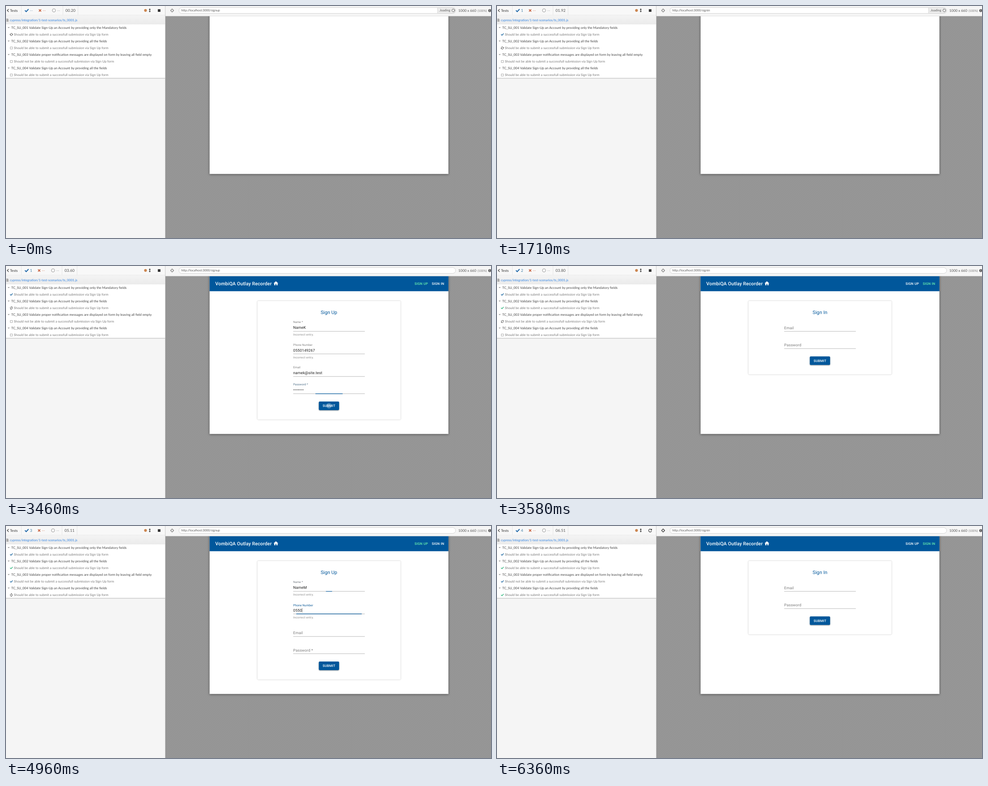
An HTML page that plays this animation: 1083 by 517 pixels, repeating every 6430 ms.

```html
<!DOCTYPE html>
<html lang="en">
<head>
<meta charset="utf-8">
<title>Sign-up test run</title>
<style>
  html, body { margin: 0; width: 100%; height: 100%; overflow: hidden; background: #969696; }
  svg { display: block; width: 100vw; height: 100vh; text-rendering: geometricPrecision; }
  text { font-family: Lato, sans-serif; white-space: pre; }
  .app text { font-family: Roboto, sans-serif; letter-spacing: .00938em; }
  .app .h { font-weight: 500; letter-spacing: .0075em; }
  .app .b { font-weight: 500; letter-spacing: .02857em; }
  .app .s { letter-spacing: .03333em; }
  .m { text-anchor: middle; }
  .frame { filter: drop-shadow(0 1.5px 2.5px rgba(0,0,0,.5)); }
  .card { filter: drop-shadow(0 .8px .8px rgba(0,0,0,.3)); }
  .btn { filter: drop-shadow(0 1px 1.2px rgba(0,0,0,.4)); }
</style>
</head>
<body>
<svg viewBox="0 0 1083 517" preserveAspectRatio="none">
  <defs>
    <pattern id="weave" width="4" height="4" patternUnits="userSpaceOnUse">
      <rect width="4" height="4" fill="#979797"/>
      <path d="M-1 1L1 -1M0 4L4 0M3 5L5 3" stroke="#919191" stroke-width=".9"/>
    </pattern>
    <linearGradient id="fade" x2="0" y2="1">
      <stop offset="0" stop-color="#f4f4f4"/><stop offset="1" stop-color="#ebebeb"/>
    </linearGradient>
    <clipPath id="btnClip"><rect x="698.5" width="45.3" height="19.2" rx="2.1"/></clipPath>
  </defs>
  <rect width="1083" height="517" fill="url(#weave)"/>
  <rect class="frame" x="454.6" y="10" width="533.3" height="364.3" fill="#fff"/>
  <rect width="355.7" height="517" fill="#f5f5f5"/>
  <rect width="355.7" height="20" fill="#f8f8f8"/>
  <rect y="20" width="355.7" height="21" fill="url(#fade)"/>
  <rect y="41" width="355.7" height="120" fill="#fff"/>
  <path d="M0 161H355.7" stroke="#aaa" stroke-width=".9"/>
  <path d="M0 20.2H355.7" stroke="#e6e6e6" stroke-width=".6"/>
  <rect x="355.7" width="727.3" height="22.6" fill="#f5f5f5"/>
  <path d="M355.7 22.4H1083" stroke="#c8c8c8" stroke-width=".5"/>
  <path d="M355.7 0V517" stroke="#b4b4b4" stroke-width=".6"/>
  <rect x="386" y="3.5" width="618" height="13" rx="6.5" fill="#fff" stroke="#c4c4c4" stroke-width=".7"/>
  <g id="panel"></g>
  <g id="app" class="app"></g>
</svg>
<script>
const LOOP = 6430, TICKS = 95, STEP = LOOP / TICKS;
const BLUE = '#01579b', GREEN = '#69f0ae', DARK = '#333', GREY = '#777';
const LEFT = 641.3, RIGHT = 801.3, MID = (LEFT + RIGHT) / 2;
const SPEED = 2.4; // characters typed per tick

// All times are in ticks; focus is name, phone, email, password.
const runs = [
  { start: -3, blank: -3, page: 5, focus: [7.6, , 10.6, 17.6], submit: 21.2, signin: 22, user: 'K' },
  { start: 23, blank: 24, page: 31, focus: [31.4, 34.4, 39, 46], submit: 50.17, signin: 52, user: 'K' },
  { start: 53, blank: 54, page: 59, focus: [], submit: 60, error: 61, user: '' },
  { start: 62, blank: 63, page: 68, focus: [68.5, 71.16, 76, 83.2], submit: 89, signin: 91, user: 'M' }
];
const FINISH = 92;
const clock = [[0, .2], [11, .9], [25, 1.92], [51, 3.6], [53, 3.8], [73, 5.11], [94, 6.51]];
const suites = [
  ['TC_SU_001 Validate Sign-Up an Account by providing only the Mandatory fields', ''],
  ['TC_SU_002 Validate Sign-Up an Account by providing all the fields', ''],
  ['TC_SU_003 Validate proper notification messages are displayed on form by leaving all field empty', 'not '],
  ['TC_SU_004 Validate Sign-Up an Account by providing all the fields', '']
];
const pen = document.createElement('canvas').getContext('2d');
pen.font = '8.53px Roboto, sans-serif';

const text = (x, y, size, str, fill = DARK, cls = '') =>
  `<text x="${x}" y="${y}" font-size="${size}" fill="${fill}" class="${cls}">${str}</text>`;
const rect = (x, y, w, h, fill, more = '') =>
  `<rect x="${x}" y="${y}" width="${w}" height="${h}" fill="${fill}" ${more}/>`;
const line = (d, stroke, width, more = '') =>
  `<path d="${d}" fill="none" stroke="${stroke}" stroke-width="${width}" ${more}/>`;
const at = (x, y, body, turn = 0) => `<g transform="translate(${x} ${y}) rotate(${turn})">${body}</g>`;

// cubic-bezier(0, 0, .2, 1) over 200 ms
function ease(ticks) {
  const x = Math.min(1, Math.max(0, ticks * STEP / 200));
  let lo = 0, hi = 1;
  for (let i = 0; i < 20; i++) {
    const s = (lo + hi) / 2;
    if (.6 * s * s * (1 - s) + s ** 3 < x) lo = s; else hi = s;
  }
  return 3 * lo * lo * (1 - lo) + lo ** 3;
}
const mix = (a, b, p) => `rgb(${a.map((v, i) => Math.round(v + (b[i] - v) * p))})`;

const check = (x, y, size, color) =>
  at(x, y, line(`M${-size} 0L${-size * .3} ${size * .7}L${size} ${-size * .7}`, color, size * .5));
const sync = (x, y, turn) => at(x, y,
  line('M-2.5 -.5A2.5 2.5 0 0 1 1.9 -1.6M2.5 .5A2.5 2.5 0 0 1 -1.9 1.6', '#444', .9) +
  '<path d="M2.9 -2.8V-.4H.5ZM-2.9 2.8V.4H-.5Z" fill="#444"/>', turn);

function timer(k) {
  const i = Math.max(1, clock.findIndex(p => p[0] >= k));
  const [a, b] = [clock[i - 1], clock[i]];
  return (a[1] + (b[1] - a[1]) * (k - a[0]) / (b[0] - a[0])).toFixed(2).padStart(5, '0');
}

function toolbar(k, passed) {
  const dx = passed ? -2 : 0, ended = k > FINISH;
  let s = line('M6 6.8L2.8 10L6 13.2', DARK, 1.2) + text(9, 12.7, 7.7, 'Tests') +
    line(`M34.3 0V20M${127 + dx} 0V20M${160.7 + dx} 0V20`, '#ddd', .7);
  s += check(46.3, 9.8, 4, '#1c66a8') + text(53.5, 12.9, 8.6, passed || '--', passed ? '#3f7fa8' : '#7f9fb8');
  s += at(76 + dx, 10, line('M-2.5 -2.5L2.5 2.5M2.5 -2.5L-2.5 2.5', '#c65a35', 1.7)) +
    text(82.3 + dx, 12.9, 8.6, '--', '#d68a6c');
  s += `<circle cx="${107 + dx}" cy="9.8" r="3.7" fill="none" stroke="#999" stroke-width="1"/>` +
    text(114.2 + dx, 12.9, 8.6, '--', '#aaa');
  s += text(132.8 + dx, 13, 8.7, timer(k), '#555');
  s += '<circle cx="311.5" cy="9.8" r="3.1" fill="#cc8650"/>' +
    '<path d="M321 5.5L323.2 8.2H321.6V11.4H323.2L321 14.1L318.8 11.4H320.4V8.2H318.8Z" fill="#333"/>';
  s += ended
    ? line('M344.6 8A3.3 3.3 0 1 0 345.1 11.3', DARK, 1.2) + '<path d="M346 5.8V9.4H342.4Z" fill="#333"/>'
    : rect(339, 7.2, 5.9, 5.8, DARK);
  return s;
}

function address(k, loading, path) {
  const ink = k > FINISH ? '#222' : '#777';
  let s = `<circle cx="371" cy="10" r="2.9" fill="none" stroke="${ink}" stroke-width="1"/>` +
    line('M371 5.8V8.5M371 11.5V14.2M366.8 10H369.5M372.5 10H375.2', ink, 1);
  s += text(391.5, 12.1, 6.9, 'http://localhost:3000/' + path, '#555');
  if (loading) {
    s += '<path d="M963.5 3.8H997.5A6.2 6.2 0 0 1 997.5 16.2H963.5Z" fill="#eee" stroke="#ccc" stroke-width=".6"/>' +
      text(966.3, 12.3, 7.1, '..loading', '#555') +
      at(998.7, 9.8, '<circle r="3.1" fill="none" stroke="#444" stroke-width="1.3" stroke-dasharray="1.4 1.035"/>', k * 24);
  }
  return s + text(1010, 13, 7.9, '1000 x 660', '#555') + text(1053, 12.6, 6.7, '(100%)', GREY) +
    '<circle cx="1080.2" cy="10.2" r="3.2" fill="#555"/>' + rect(1079.7, 9.5, 1, 2.6, '#fff') + rect(1079.7, 8, 1, 1, '#fff');
}

function testList(k, active) {
  let s = '<path d="M1 28H4L5.6 29.6V35H1Z" fill="#aaa"/>' +
    text(8.5, 34, 7.2, 'cypress/integration/1-test-scenarios/ts_0001.js', '#2f83e4');
  suites.forEach(([title, not], i) => {
    const y = 48.2 + i * 30.1, ty = y + 15.3;
    s += `<path d="M3.8 ${y - 1.2}H8.2L6 ${y + 1.3}Z" fill="#999"/>` + text(11.8, y + 2.5, 7.38, title, '#444');
    if (i < active) s += check(12, ty - .3, 2.8, i % 2 ? '#35b880' : '#1c66a0');
    else if (i === active) s += sync(12, ty, (k - runs[i].start) * STEP * .18);
    else s += rect(9.6, ty - 2.4, 4.7, 4.7, 'none', 'stroke="#999" stroke-width=".8"');
    s += text(17.5, ty + 2.4, 7.25, `Should ${not}be able to submit a successfull submission via Sign Up form`, GREY);
  });
  return s;
}

// One text field: y is its underline, on and off are focus times.
function field(k, y, label, value, on = Infinity, off = Infinity, bad = false) {
  const shrink = ease(k - on), focus = shrink * (1 - ease(k - off));
  const typed = value.slice(0, Math.max(0, Math.floor((k - on - .1) * SPEED)));
  const color = bad ? '#f44336' : mix([125, 125, 125], [1, 87, 155], focus);
  let s = line(`M${LEFT} ${y}H${RIGHT}`, bad ? '#f44336' : '#949494', bad ? 1 : .65);
  s += text(LEFT, y - 4.8 - 13.6 * shrink, 8.53 - 2.13 * shrink, label, color);
  if (focus > 0) {
    const half = focus * (RIGHT - LEFT) / 2;
    s += line(`M${MID - half} ${y}H${MID + half}`, BLUE, 1.1);
  }
  if (typed) s += text(LEFT, y - 5.2, 8.53, typed, '#222');
  if (k >= on && k < off) {
    const x = LEFT + .4 + pen.measureText(typed).width + typed.length * .08;
    s += line(`M${x} ${y - 13}V${y - 3}`, '#222', .6);
  }
  return s;
}

function button(y, dt) {
  let s = rect(698.5, y, 45.3, 19.2, BLUE, 'rx="2.1" class="btn"');
  if (dt > 0) s += `<g transform="translate(0 ${y})"><circle cx="721.2" cy="9.6" r="${Math.min(24, dt * 7.2)}" fill="#fff" opacity=".28" clip-path="url(#btnClip)"/></g>`;
  return s + text(721.2, y + 12.2, 7.47, 'SUBMIT', '#fff', 'b m');
}

const card = bottom => rect(561.3, 77.7, 319.9, bottom - 77.7, '#fff', 'rx="2.1" class="card"');
const heading = str => text(721.2, 107.2, 10.67, str, BLUE, 'm');

function shell(signin) {
  return rect(454.6, 22.8, 533.3, 33.4, BLUE) + text(467.3, 43.1, 10.67, 'VombiQA Outlay Recorder', '#fff', 'h') +
    '<path transform="translate(596.3 32.4) scale(.533)" d="M10 20v-6h4v6h5v-8h3L12 3 2 12h3v8z" fill="#fff"/>' +
    text(912.2, 42, 7.47, 'SIGN UP', signin ? '#fff' : GREEN, 'b') +
    text(950.7, 42, 7.47, 'SIGN IN', signin ? GREEN : '#fff', 'b');
}

function signInPage(k) {
  return shell(true) + card(241.7) + heading('Sign In') +
    field(k, 145.6, 'Email', '') + field(k, 184, 'Password', '') + button(201.4, 0);
}

function signUpPage(k, run) {
  const bad = k >= run.error, grow = bad ? 12 : 0;
  const helper = (y, color = '#858585') => text(LEFT, y + 9.6, 6.4, 'Incorrect entry.', color, 's');
  const fields = [
    [145.6, 'Name *', 'Name' + run.user],
    [195.9, 'Phone Number', '0550149267'],
    [246.2, 'Email', `name${run.user.toLowerCase()}@site.test`],
    [284.6, 'Password *', '••••••••']
  ];
  let s = shell(false) + card(342.3 + grow) + heading('Sign Up');
  fields.forEach(([y, label, value], i) => {
    const off = run.focus.slice(i + 1).find(v => v !== undefined) ?? run.submit;
    s += field(k, y, label, value, run.focus[i], off, bad && i % 3 === 0);
  });
  s += helper(145.6, bad ? '#f44336' : undefined) + helper(195.9);
  if (bad) s += helper(284.6, '#f44336');
  return s + button(302 + grow, k - run.submit);
}

function draw(k) {
  const active = k >= FINISH ? 4 : runs.filter(r => k >= r.start).length - 1;
  const i = Math.min(active, 3), run = runs[i], prev = runs[i - 1];
  const loading = k >= run.blank && k < run.page;
  const shown = k < run.blank ? prev : run;
  const signin = k >= shown.signin;
  const path = signin || (loading && prev && prev.signin) ? 'signin' : 'signup';
  document.getElementById('panel').innerHTML = toolbar(k, active) + address(k, loading, path) + testList(k, active);
  document.getElementById('app').innerHTML = loading ? '' : signin ? signInPage(k) : signUpPage(k, shown);
}

let last = -1;
function frame() {
  const t = performance.now() % LOOP;
  const k = Math.min(TICKS - 1, Math.floor((t + 15) / STEP));
  if (k !== last) draw(last = k);
  requestAnimationFrame(frame);
}
frame();
</script>
</body>
</html>
```
